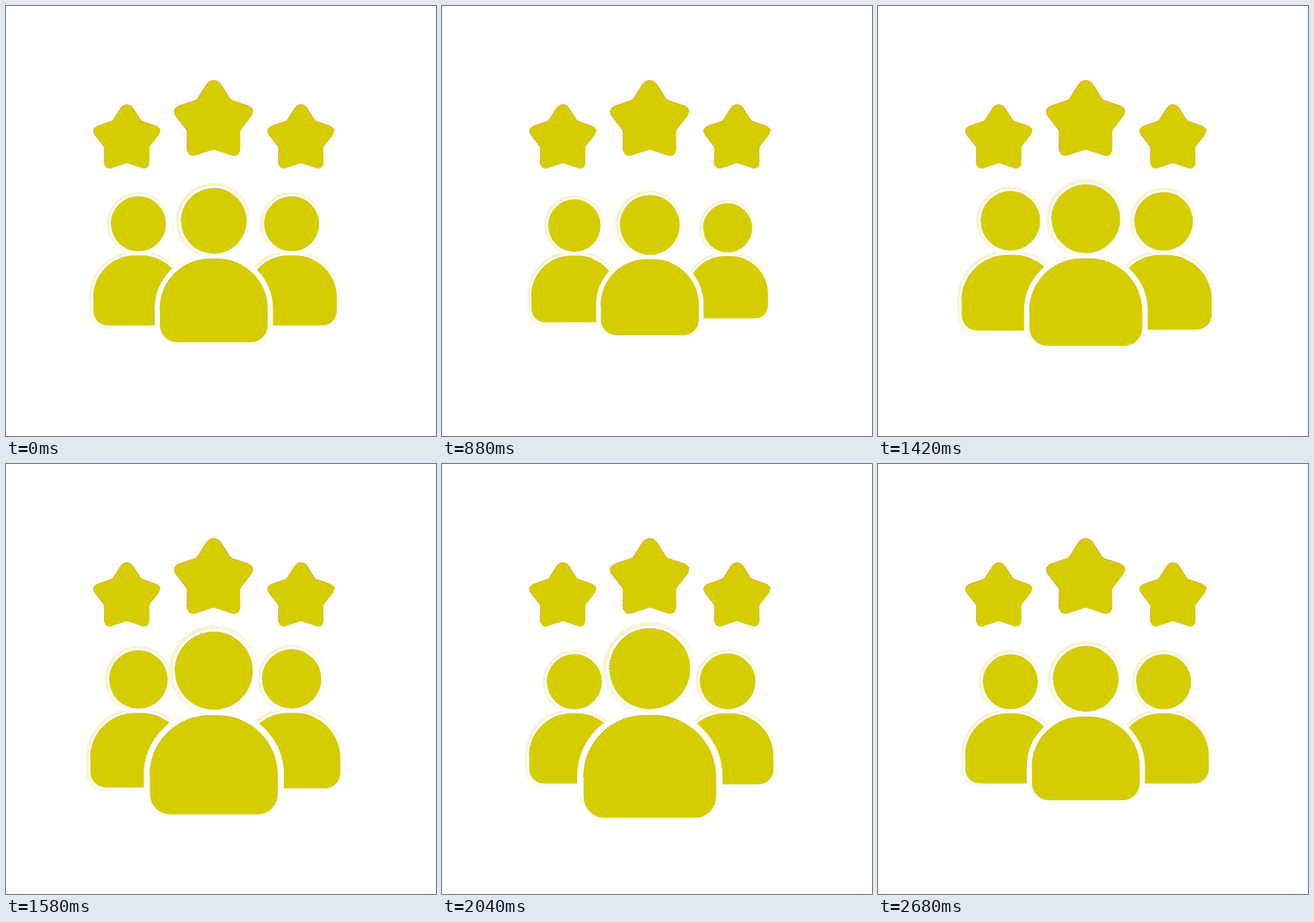
Recreate the animation shown at these times as an HTML page. Size 500 px wide and 500 px high, loop 3 s.

```html
<!DOCTYPE html>
<html lang="en">
<head>
<meta charset="utf-8">
<title>Team rating</title>
<style>
  html, body { margin: 0; width: 100%; height: 100%; overflow: hidden; background: #fff; }
  svg { display: block; width: 100%; height: 100%; }
  .fill { fill: #d5cd00; }
  .edge { fill: none; stroke: #ff3000; stroke-width: .9; stroke-dasharray: 1 1.4; }
  .soft { stroke: #c06a00; opacity: .75; }
  .halo { fill: none; stroke: url(#glow); stroke-width: 12; }
  .gap { fill: none; stroke: #fff; stroke-width: 5; }
  .front .torso.halo { stroke: #fff; }
</style>
</head>
<body>
<svg viewBox="0 0 500 500">
  <defs>
    <linearGradient id="glow" x1="0" y1="0" x2="1" y2="1">
      <stop offset="0" stop-color="#f3f2cc"/>
      <stop offset=".45" stop-color="#f8f7e0"/>
      <stop offset=".8" stop-color="#fff"/>
    </linearGradient>
  </defs>
  <g id="stage"></g>
</svg>
<script>
const LOOP = 3000, FRAME = 20, PHASE = 720;
const stage = document.getElementById('stage');

// Shapes are drawn at the size of the middle figure, around its centre.
const torso = 'M-62.7 50.5C-62.7 18.5-36.7-7.5-4.7-7.5H4.7C36.7-7.5 62.7 18.5 62.7 50.5' +
  'V69.5A20 20 0 0 1 42.7 89.5H-42.7A20 20 0 0 1-62.7 69.5Z';
const torsoEdge = 'M-62.7 50.5C-62.7 18.5-36.7-7.5-4.7-7.5H4.7Q17-7.5 28-2';
const head = 'M-38.2-51.5A38.2 38.2 0 0 1 38.2-51.5A38.2 38.2 0 0 1-38.2-51.5Z';
const headEdge = 'M-38.2-51.5A38.2 38.2 0 0 1 19.1-84.6';
const star = 'M-8 4Q0-4 8 4L18 20Q19.5 22.5 22 23.4L40 29.5Q49 33.5 44 41.5L32 57Q30.7 59 30.8 62' +
  'L31 79Q30.5 89.5 21.5 87.5L0 80.5L-21.5 87.5Q-30.5 89.5-31 79L-30.8 62Q-30.7 59-32 57' +
  'L-44 41.5Q-49 33.5-40 29.5L-22 23.4Q-19.5 22.5-18 20Z';
const starEdge = 'M-31 82L-30.8 62Q-30.7 59-32 57L-44 41.5Q-49 33.5-40 29.5L-22 23.4' +
  'Q-19.5 22.5-18 20L-8 4Q0-4 8 4L18 20Q19.5 22.5 22 23.4L40 29.5Q46 32 45.5 36';

const path = (cls, d) => `<path class="${cls}" d="${d}"/>`;

const figure =
  path('torso halo', torso) + path('halo', head) +
  path('gap', torso) + path('gap', head) +
  path('fill', torso) + path('fill', head) +
  path('edge soft', torsoEdge) + path('edge soft', headEdge);

const stars = [[140.5, 114.5, .848], [241.5, 86.5, 1], [343, 114.5, .848]];

const people = [
  { x: 154, y: 296.5, size: .8375, delay: 0, low: .89, high: 1.08 },
  { x: 332.2, y: 296.5, size: .8375, delay: 260, low: .89, high: 1.08 },
  { x: 241.7, y: 301.5, size: 1, delay: 520, low: .895, high: 1.24, front: true }
];

const place = (x, y, s) => `translate(${x} ${y}) scale(${s})`;

stage.innerHTML =
  people.map(p => `<g class="person${p.front ? ' front' : ''}">${figure}</g>`).join('') +
  stars.map(s => `<g transform="${place(...s)}">${path('fill', star)}${path('edge', starEdge)}</g>`).join('');
const groups = stage.querySelectorAll('.person');

// cubic-bezier(.38, 0, 0, 1), solved by bisection
function ease(u) {
  if (u <= 0) return 0;
  if (u >= 1) return 1;
  let lo = 0, hi = 1;
  for (let i = 0; i < 24; i++) {
    const s = (lo + hi) / 2;
    const x = 3 * (1 - s) * (1 - s) * s * .38 + s * s * s;
    if (x < u) lo = s; else hi = s;
  }
  return lo * lo * (3 - 2 * lo);
}

// Shrink, overshoot, then settle.
function pulse(t, { low, high }) {
  const keys = [1, low, high, 1];
  const u = Math.max(0, t / PHASE);
  const i = Math.min(2, Math.floor(u));
  return keys[i] + (keys[i + 1] - keys[i]) * ease(u - i);
}

function draw(t) {
  people.forEach((p, i) => {
    const s = p.size * pulse(t - p.delay, p);
    groups[i].setAttribute('transform', place(p.x, p.y, s.toFixed(5)));
  });
}

const start = performance.now();
function tick(now) {
  const t = Math.max(0, now - start) % LOOP;
  draw(Math.floor(t / FRAME) * FRAME);
  requestAnimationFrame(tick);
}
draw(0);
requestAnimationFrame(tick);
</script>
</body>
</html>
```
